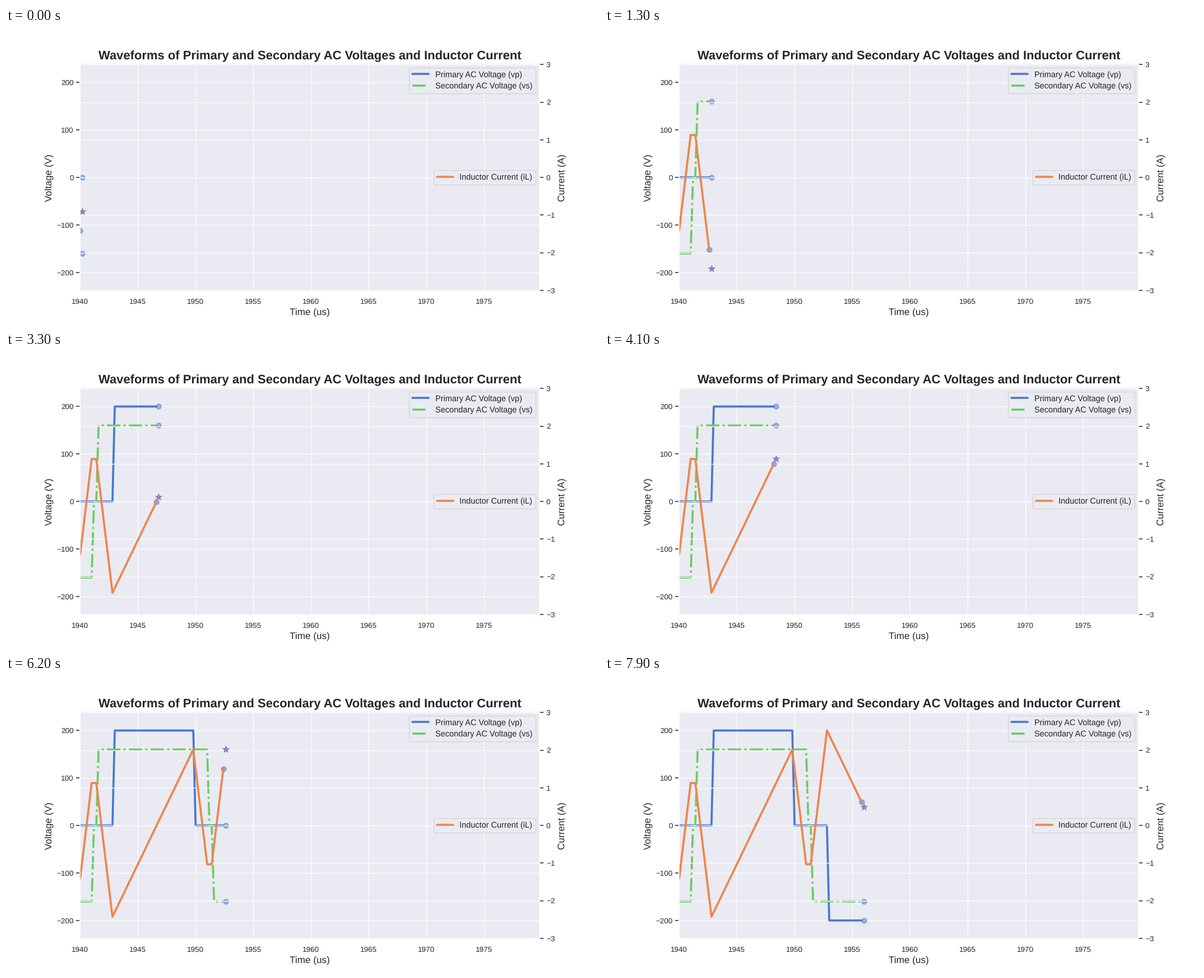
These frames come from a looping animation (1058x529 px, 8 s). A matplotlib script:

```python
import numpy as np
import matplotlib.pyplot as plt
from matplotlib.animation import FuncAnimation

FRAMES, INTERVAL = 80, 100
DT = 0.2            # us per sample
PERIOD = 100        # samples per switching cycle
INDUCTANCE = 63     # uH
START_CURRENT = -1.41
BLUE, GREEN, ORANGE, PURPLE = "#4878d0", "#6acc64", "#ee854a", "#956cb4"
DARK, PANEL = "#262626", "#eaeaf2"

plt.rcParams.update({
    "font.family": "Liberation Sans",
    "text.color": DARK,
    "text.hinting": "no_hinting",
    "axes.labelcolor": DARK,
    "axes.facecolor": PANEL,
    "axes.edgecolor": "white",
    "axes.linewidth": 1.25,
    "axes.axisbelow": True,
    "lines.solid_capstyle": "round",
})

k = np.arange(FRAMES + 1)
t = 1940 + DT * k


def bridge(level, start, width):
    """Positive pulse, then the same pulse negated half a cycle later."""
    high = (k - start) % PERIOD < width
    low = (k - start - PERIOD // 2) % PERIOD < width
    return level * (high.astype(float) - low)


# The inductor integrates the voltage difference of the two bridges.
vp = bridge(200, 15, 35)
vs = bridge(160, 8, 48)
rise = (vp - vs) * DT / INDUCTANCE
il = START_CURRENT + np.cumsum(rise) - rise[0]

fig = plt.figure(figsize=(12, 6), dpi=1058 / 12, facecolor="white")
ax = fig.add_axes([0.125, 0.11, 0.775, 0.77])
ax2 = ax.twinx()

ax.set_xlim(1940, 1979.8)
ax.set_ylim(-240, 240)
ax2.set_ylim(-3.0286, 3.0286)
ax.set_xticks(range(1940, 1980, 5))
ax.set_yticks(range(-200, 201, 100))
ax2.set_yticks(range(-3, 4))
for a in (ax, ax2):
    a.grid(True, color="white", linewidth=1)
    a.tick_params(length=6, width=1.25, pad=3.5, color=DARK,
                  labelcolor=DARK, labelsize=11)
ax.tick_params(axis="x", bottom=False, pad=4.3)

ax.set_title("Waveforms of Primary and Secondary AC Voltages and Inductor Current",
             fontsize=18, fontweight="bold")
ax.set_xlabel("Time (us)", fontsize=14)
ax.set_ylabel("Voltage (V)", fontsize=14)
ax2.set_ylabel("Current (A)", fontsize=14)


def trace(a, color, style, label):
    return a.plot([], [], style, color=color, linewidth=3, label=label)[0]


def marker(a, shape, size, color, alpha):
    return a.scatter([], [], marker=shape, s=size, color=color, alpha=alpha,
                     linewidths=1.5, zorder=1)


traces = [
    (trace(ax, BLUE, "-", "Primary AC Voltage (vp)"), vp),
    (trace(ax, GREEN, "-.", "Secondary AC Voltage (vs)"), vs),
    (trace(ax2, ORANGE, "-", "Inductor Current (iL)"), il),
]
# Each marker: artist, data, samples ahead of the trace end
markers = [
    (marker(ax, "o", 50, BLUE, 0.5), vp, 1),
    (marker(ax, "o", 50, BLUE, 0.5), vs, 1),
    (marker(ax2, "o", 50, BLUE, 0.5), il, 0),
    (marker(ax2, "*", 80, PURPLE, 0.8), il, 1),
]

ax.legend(loc="upper right", fontsize=11.9, labelspacing=0.45)
ax2.legend(loc="center right", fontsize=11.9)


def update(n):
    for line, y in traces:
        line.set_data(t[:n + 1], y[:n + 1])
    for dot, y, lead in markers:
        dot.set_offsets([(t[n + lead], y[n + lead])])
    return [item[0] for item in traces + markers]


def init():
    return update(0)


anim = FuncAnimation(fig, update, frames=FRAMES, init_func=init,
                     interval=INTERVAL, repeat=True, repeat_delay=0)
plt.show()
```
